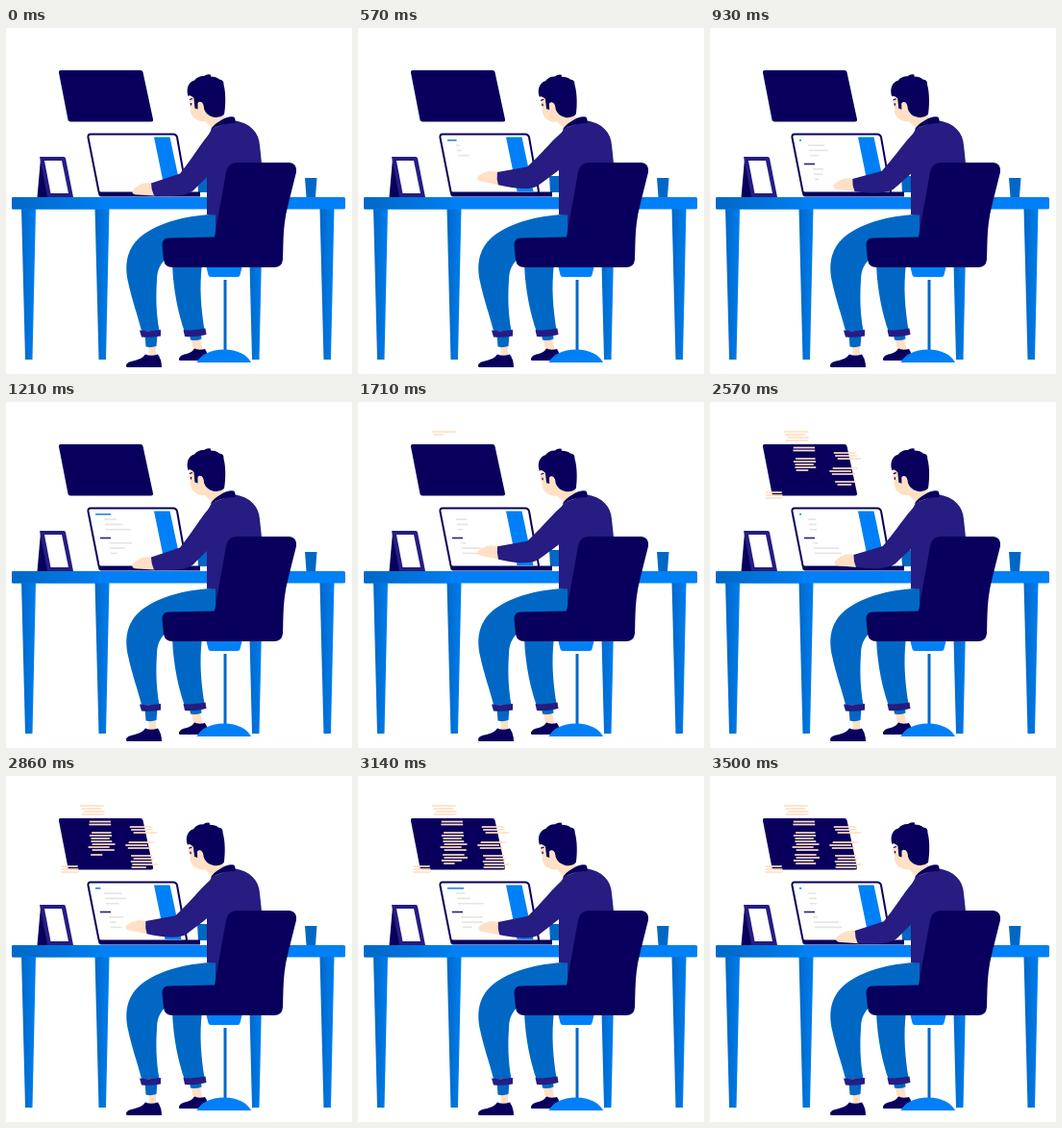
Recreate the animation shown at these times as an HTML page. Size 360 px wide and 360 px high, loop 3.57 s.

```html
<!DOCTYPE html>
<html lang="en">
<head>
<meta charset="utf-8">
<title>Working at a desk</title>
<style>
  html, body { margin: 0; width: 100%; height: 100%; overflow: hidden; background: #fff; }
  svg { display: block; width: 100vw; height: 100vh; }
  .navy { fill: #08005c; }
  .knit { fill: #261c82; }
  .blue { fill: #0080f6; }
  .jean { fill: #0068c4; }
  .skin { fill: #ffe0c4; }
  .white { fill: #fff; }
  .shade { fill: url(#shade); }
</style>
</head>
<body>
<svg viewBox="0 0 360 360" xmlns="http://www.w3.org/2000/svg">
  <defs>
    <linearGradient id="shade">
      <stop offset="0" stop-color="#0068c8"/>
      <stop offset="1" stop-color="#007eee"/>
    </linearGradient>
  </defs>

  <!-- board -->
  <path class="navy" d="M57 44H140Q142 44 142.500 46L153 95Q153.500 97.500 151 97.500H67Q65 97.500 64.500 95.500L55 46.500Q54.500 44 57 44Z"/>
  <g id="code" stroke="#ffe0c2" stroke-width="1.700"></g>

  <!-- desk -->
  <g id="legs" class="shade"></g>
  <rect class="blue" x="6" y="176" width="347" height="12.500" rx="1.500"/>
  <path class="shade" d="M7.500 176H96L100 188.500H7.500Q6 188.500 6 187V177.500Q6 176 7.500 176Z"/>

  <!-- photo frame -->
  <path class="navy" d="M36 136L32.500 176H44Z"/>
  <path class="knit" d="M35 134H60Q61.500 134 62 135.500L70 176H43Z"/>
  <path class="white" d="M40 138H58L65 172H46.500Z"/>

  <!-- cups -->
  <path class="jean" d="M311 156H323.500L322 176H312.500Z"/>
  <path class="jean" d="M199 154H212V171H200Z"/>

  <!-- laptop -->
  <path d="M88 110.500H174Q177 110.500 178 113.500L188 170Q188 172 186 172H99Q97 172 96.500 170L85.500 114Q85 110.500 88 110.500Z" fill="#fff" stroke="#08005c" stroke-width="2"/>
  <path class="blue" d="M154 113.500H170.500L182.500 170H165.500Z"/>
  <g id="page" stroke-width="1.600"></g>
  <path class="navy" d="M96 170.500H202V175.500H99Q96 175.500 96 170.500Z"/>

  <!-- far leg -->
  <path class="skin" d="M193 324L202 322L204.500 336H195Z"/>
  <path class="jean" d="M191 319H203L203.500 323.500Q198 326 192 324.500Z"/>
  <path class="navy" d="M180 344Q181 340 188 339Q194 337 196 333.500Q200 335.500 207 334Q211 340 210 346H181Q179.500 346 180 344Z"/>
  <path class="jean" d="M173 245C174 275 180 299 185.500 315L206.500 314C203 292 201 270 204 245Z"/>
  <path class="knit" d="M184.500 314Q196 315 207.500 312.500L208.500 319Q197 322 186 321Z"/>

  <!-- near leg -->
  <path class="skin" d="M148 329H156V342H149Z"/>
  <path class="jean" d="M144.500 319H157.500L156.500 331Q151 333 145.500 331.500Z"/>
  <path class="navy" d="M125 351Q125 347.500 134 346Q142 344 145 339.500Q151 342 158 339.500Q162 345 162 353H126Q125 353 125 351Z"/>
  <path class="jean" d="M220 193.500C184 195 154 204 137 220C124 233 124 250 127 264C131 283 137 299 141 315H159.500C156 296 156 278 157 262C157.500 250 161 246 166 240L222 222Z"/>
  <path class="knit" d="M139 314.500Q150 316 161 314V320.500Q150 322.500 141 321.500Z"/>

  <!-- body -->
  <path class="knit" d="M214 105L237 96C254 99 263 108 264 122L267 150L260 215H218V194.500L209 194V147L205 122Z"/>
  <g id="head">
    <path class="skin" d="M192 70L191 75L189.800 78.500L192 81C191.500 88 193 92 197 94.500Q202 98 207 97L214 104L227 94L222 74L205 66Z"/>
    <path class="navy" d="M189.500 71C187 63 190 56 196 54.500Q200 49.500 206 50Q209 47.500 213 48.500L213 50.500Q219 50.500 222 53.500Q227 54 226.500 59C229 68 228.500 82 227 90Q222 94.500 215 92.500Q208 90.500 206 84C206 78 202 75 199.500 78V84.500L196.500 83.500L195.500 73Q192 69 189.500 71Z"/>
    <path class="skin" d="M200 79Q202.500 75 205 79.500Q206 85 203 86Q200 85 200 79Z"/>
    <path d="M190.800 74.500L194 73.500M192.500 78V80.500" stroke="#08005c" stroke-width="1.200" fill="none"/>
  </g>
  <path class="navy" d="M213 106Q215 101 223 96.500Q231 91.500 237 92.500Q239.500 95 238 99Q225 99 213 106Z"/>

  <!-- arm -->
  <g id="arm">
    <path class="skin" d="M155 161L143 161.500C138 163.500 133 166.500 131.500 169.500Q130.500 173.500 137 173.500L155 174.500Z"/>
    <path class="knit" d="M218 104.500C207 112 197 132 181 151.500L151 161.500Q151 168 154 174.500C172 176 188 175 195 169C205 159 218 146 234 130Z"/>
  </g>

  <!-- chair -->
  <path class="blue" d="M208 247H246L243.500 257Q243 259 241 259H213Q211 259 210.500 257Z"/>
  <rect class="jean" x="226.500" y="262" width="3" height="75"/>
  <path class="blue" d="M198.500 348Q205 335 227 334.500Q248 335 255 348Z"/>
  <path class="navy" d="M240 140H295Q303 141 302 150L293 186Q289 202 288.500 222L288 241Q287 249 279 249H173Q165 249 164 241L162.500 226Q162.500 218.500 169 218.500L217 217.500L229 150Q231 140.500 240 140Z"/>
</svg>
<script>
const LOOP = 3570, COUNT = 50, STEP = LOOP / COUNT;
const TAU = 2 * Math.PI;
const $ = id => document.getElementById(id);
const clamp = v => Math.min(1, Math.max(0, v));

let seed = 7;
function random(min, max) {
  seed = seed * 16807 % 2147483647;
  return min + (max - min) * seed / 2147483647;
}

function add(parent, tag, attrs) {
  const el = document.createElementNS("http://www.w3.org/2000/svg", tag);
  for (const k in attrs) el.setAttribute(k, attrs[k]);
  return parent.appendChild(el);
}

for (const x of [23.5, 100, 259.5, 334])
  add($("legs"), "path", { d: `M${x - 7.5} 187h15l-3.500 158h-7.500Z` });

// Code on the board: columns of paragraphs, typed row by row
const PACE = 95;
const codeRows = [];
function typeColumn(start, width, paragraphs) {
  for (const [left, top, count] of paragraphs)
    for (let i = 0; i < count; i++, start += PACE) {
      const x = left + random(0, 5), y = top + 3 * i;
      const el = add($("code"), "line", { x1: x, y1: y, y2: y });
      codeRows.push({ el, x, w: width + random(-3, 3), at: start });
    }
}
typeColumn(1570, 22, [[77, 31, 4], [83, 47.5, 2], [85, 59, 7], [85, 82, 4]]);
typeColumn(1840, 24, [[128, 53, 3], [124, 69, 3], [128, 83, 5]]);
typeColumn(1750, 18, [[56, 94, 3]]);

// Laptop text: two headings with three rows each, rewritten over and over
const pageRows = [];
function addRow(x, y, w, stroke, sway) {
  const el = add($("page"), "line", { x1: x, y1: y, y2: y, stroke });
  pageRows.push({ el, x, w, sway, at: 2 + pageRows.length * 1.5, phase: random(0, TAU) });
}
for (const [x, y, w, color, sway] of [[93, 116.8, 17, "#2387e8", 0.5], [98, 141.5, 11, "#261c82", 0]]) {
  addRow(x, y, w, color, sway);
  for (let i = 1; i <= 3; i++) addRow(x + 8 + i, y + 5.3 * i, random(14, 34), "#e4e4e2", 0.4);
}

function setWidth({ el, x, w }, part) {
  el.setAttribute("x2", x + w * part);
  el.setAttribute("visibility", part > 0.02 ? "visible" : "hidden");
}

function draw(now) {
  const n = Math.floor((now % LOOP) / STEP + 0.1) % COUNT;
  const t = n * STEP;
  const lift = (1 - Math.cos(n / COUNT * 3 * TAU)) / 2;
  $("arm").setAttribute("transform", `rotate(${8.6 * lift} 225 115)`);
  $("head").setAttribute("transform", `rotate(${-1.5 * lift} 222 98)`);
  for (const row of codeRows) setWidth(row, clamp((t - row.at) / PACE));
  for (const row of pageRows) {
    const wave = 1 - row.sway + row.sway * Math.cos(n / 13 * TAU + row.phase);
    setWidth(row, wave * clamp((n - row.at) / 2));
  }
}

const begin = performance.now();
function tick() {
  draw(performance.now() - begin);
  requestAnimationFrame(tick);
}
tick();
</script>
</body>
</html>
```
